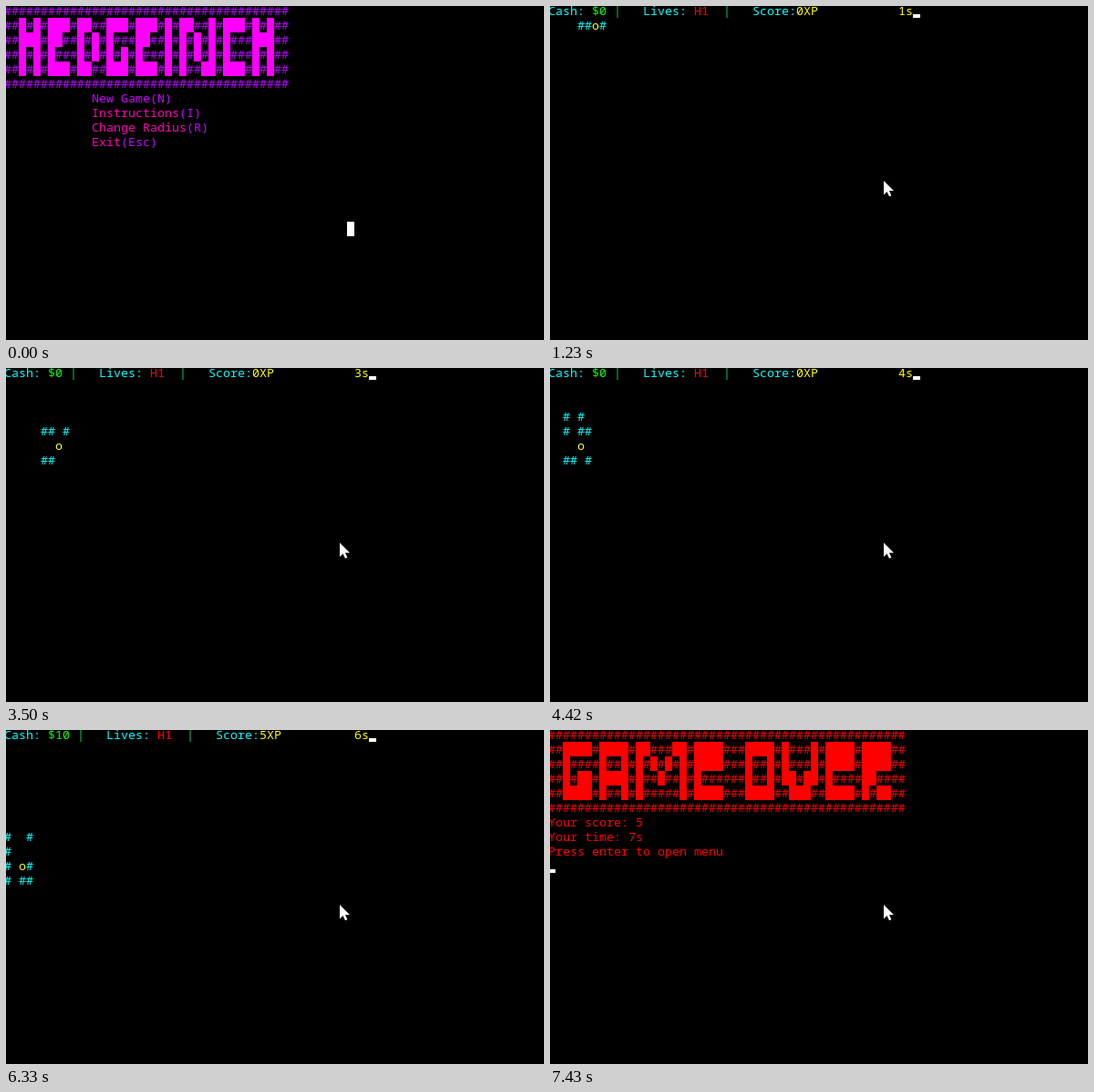
An HTML page for the animation above (8000 ms loop, 590 by 367 pixels).

```html
<!DOCTYPE html>
<html lang="en">
<head>
<meta charset="utf-8">
<title>Console maze</title>
<style>
  html, body { margin: 0; width: 100%; height: 100%; overflow: hidden; background: #000; }
  #stage { position: relative; width: 590px; height: 367px; overflow: hidden; background: #000; }
  #screen div {
    position: absolute; white-space: pre;
    font: 13.3333px/16px "Noto Sans Mono", "DejaVu Sans Mono", monospace;
    font-variant-ligatures: none;
  }
  #mouse { position: absolute; left: 0; top: 0; overflow: visible; visibility: hidden; }
</style>
</head>
<body>
<div id="stage">
  <div id="screen"></div>
  <svg id="mouse" width="12" height="18"><path d="M0 0V15.5L3.5 12L6 17.2L8.4 16.2L6 11H11Z" fill="#fff"/></svg>
</div>
<script>
const LOOP = 8000, CW = 8, RH = 16, X0 = -2, Y0 = -3;
const CYAN = '#0ff', YELLOW = '#ff0', PIPE = '#00d060', RED = '#f00';
const PINK = '#ff00b8', VIOLET = '#c800ff';
const screen = document.getElementById('screen');
const mouse = document.getElementById('mouse');

// ---- character grid helpers ----
function cell(col, row) {
  const d = document.createElement('div');
  d.style.left = X0 + col * CW + 'px';
  d.style.top = Y0 + row * RH + 'px';
  screen.append(d);
  return d;
}

function put(col, row, text, color) {
  const d = cell(col, row);
  d.textContent = text;
  d.style.color = color;
}

function block(col, row, cols, color, height = RH) {
  const d = cell(col, row);
  d.style.width = cols * CW + 'px';
  d.style.height = height + 'px';
  d.style.marginTop = RH - height + 'px';
  d.style.background = color;
}

const caret = (col, row) => block(col, row, 1, '#fff', 4);

// ---- banners: x = solid cell, . = hash ----
const SMALL = {
  H: 'x.x/xxx/x.x/x.x', E: 'xxx/xx./x../xxx', D: 'xx./x.x/x.x/xx.',
  G: 'xxx/x../x.x/xxx', I: 'x/x/x/x', N: 'xx..x/x.x.x/x.x.x/x..xx',
  C: 'xxx/x../x../xxx'
};
const LARGE = {
  G: 'xxxx/x.../x.xx/xxxx', A: 'xxxx/x..x/xxxx/x..x',
  M: 'xx...xx/x.x.x.x/x..x..x/x.....x', E: 'xxxx/xxxx/x.../xxxx',
  O: 'xxxx/x..x/x..x/xxxx', V: 'x...x/x...x/xx.xx/.xxx.',
  R: 'xxxx/xxxx/xx../x.xx', ' ': './././.'
};

function banner(word, font, fill, hash) {
  const glyphs = [...word].map(c => font[c].split('/'));
  const rows = [0, 1, 2, 3].map(r => '..' + glyphs.map(g => g[r]).join('.') + '..');
  const edge = '.'.repeat(rows[0].length);
  [edge, ...rows, edge].forEach((line, row) => {
    let col = 0;
    for (const run of line.match(/x+|\.+/g)) {
      if (run[0] === 'x') block(col, row, run.length, fill);
      else put(col, row, '#'.repeat(run.length), hash);
      col += run.length;
    }
  });
}

// ---- screens ----
function menu() {
  banner('HEDGEINCH', SMALL, '#f0f', '#b800ff');
  [['New Game', '(N)', VIOLET], ['Instructions', '(I)', PINK],
   ['Change Radius', '(R)', PINK], ['Exit', '(Esc)', PINK]].forEach(([label, key, color], i) => {
    put(12, 6 + i, label, color);
    put(12 + label.length, 6 + i, key, VIOLET);
  });
  block(47, 15, 1, '#fff');
}

const MAZE = [
  '',
  '###### ##### #',
  '#',
  '# # #       #',
  '# # ### #',
  '#',
  '#### ##',
  '#  # #',
  '# $  #',
  '#  #',
  '# ##'
];

function game(x, y, secs, cash = 0, score = 0, blink = true) {
  const s = String(cash).length - 1;
  put(0, 0, 'Cash:', CYAN);
  put(6, 0, '$' + cash, '#0f0');
  put(9 + s, 0, '|', PIPE);
  put(13 + s, 0, 'Lives:', CYAN);
  put(20 + s, 0, 'H1', RED);
  put(24 + s, 0, '|', PIPE);
  put(28 + s, 0, 'Score:', CYAN);
  put(34 + s, 0, score + 'XP', YELLOW);
  put(48, 0, secs + 's', YELLOW);
  if (blink) caret(50, 0);

  // only cells near the player are visible
  for (let r = Math.max(1, y - 2); r <= y + 1; r++) {
    for (let c = Math.max(0, x - 2); c <= x + 1; c++) {
      const ch = (MAZE[r] || '')[c];
      if (c === x && r === y) put(c, r, 'o', YELLOW);
      else if (ch === '#') put(c, r, '#', CYAN);
      else if (ch === '$' && !cash) put(c, r, '$', '#008000');
    }
  }
}

function gameOver() {
  banner('GAME OVER', LARGE, RED, '#f00000');
  put(0, 6, 'Your score: 5', RED);
  put(0, 7, 'Your time: 7s', RED);
  put(0, 8, 'Press enter to open menu', RED);
  caret(0, 9);
}

// ---- timeline: start time, screen, arguments ----
const STEPS = [
  [0, menu],
  [1230, game, 6, 1, 1],
  [1790, game, 6, 1, 1, 0, 0, false],
  [2300, game, 6, 2, 2],
  [2630, game, 6, 3, 2],
  [2990, game, 7, 3, 2],
  [3270, game, 7, 4, 3],
  [3500, game, 7, 5, 3],
  [3930, game, 6, 5, 3],
  [4160, game, 5, 5, 3],
  [4420, game, 4, 5, 4],
  [4850, game, 4, 6, 4],
  [5130, game, 4, 7, 4],
  [5410, game, 4, 8, 5],
  [5690, game, 3, 8, 5],
  [5950, game, 2, 8, 5, 10, 5],
  [6330, game, 2, 9, 6, 10, 5],
  [6610, game, 12, 1, 6, 10, 5],
  [7070, game, 12, 2, 6, 10, 5],
  [7400, caret, 50, 0],
  [7430, gameOver]
];

const MOUSE_PATH = [[486, 348], [462, 318], [430, 280], [396, 236], [364, 196], [349, 178], [366, 192]];
const MOUSE_START = 30, MOUSE_STEP = 380 / 6;

function moveMouse(t) {
  const i = Math.floor((t - MOUSE_START) / MOUSE_STEP + 0.001);
  mouse.style.visibility = i < 0 ? 'hidden' : 'visible';
  if (i < 0) return;
  const [x, y] = MOUSE_PATH[Math.min(i, MOUSE_PATH.length - 1)];
  mouse.style.transform = `translate(${x}px, ${y}px)`;
}

let shown = null;
const start = performance.now();

function tick() {
  const t = Math.max(0, performance.now() - start) % LOOP;
  const step = STEPS.findLast(s => s[0] <= t);
  if (step !== shown) {
    const [, draw, ...args] = step;
    screen.replaceChildren();
    draw(...args);
    shown = step;
  }
  moveMouse(t);
  requestAnimationFrame(tick);
}
tick();
</script>
</body>
</html>
```
